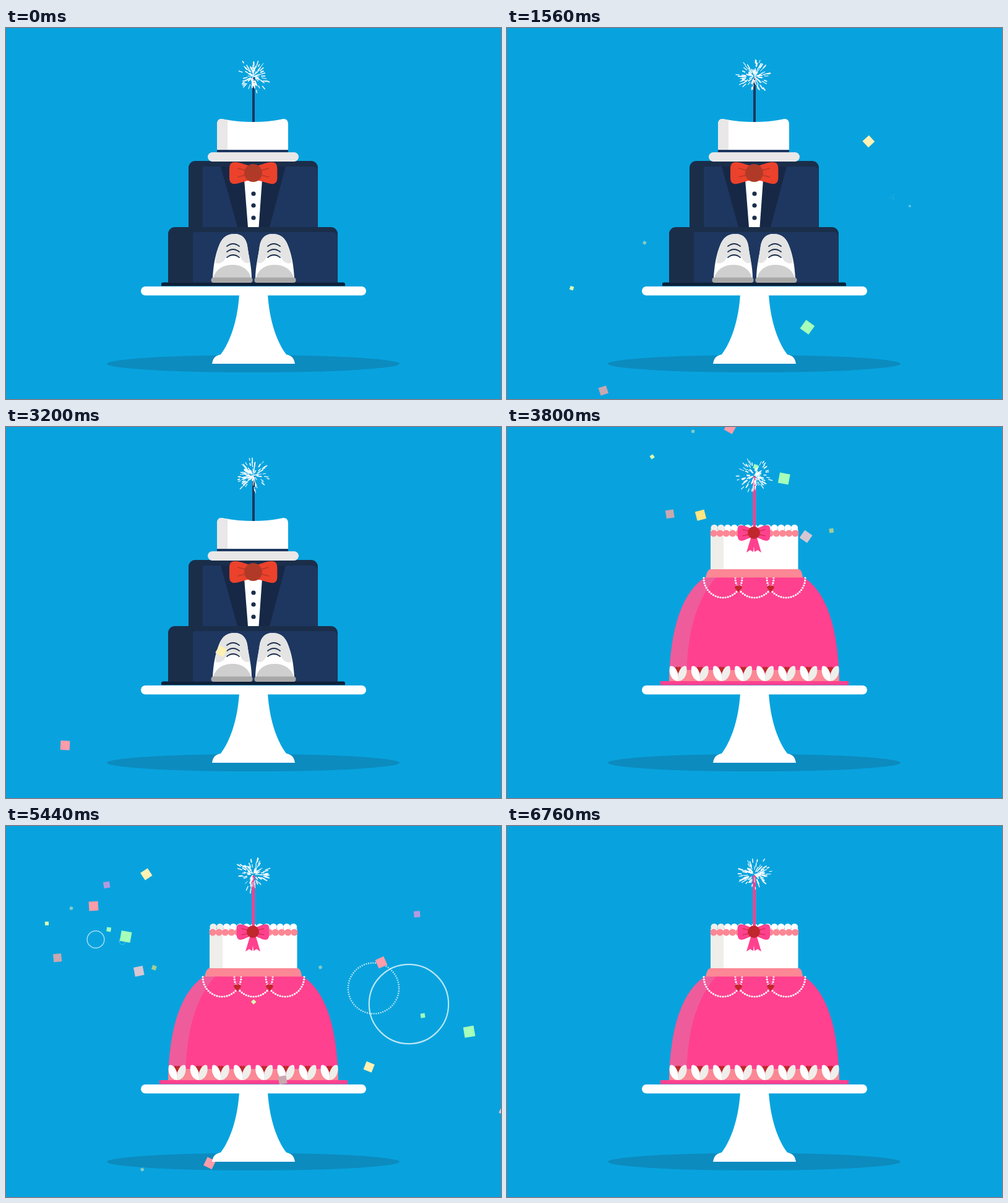
An HTML page with a canvas that plays this animation: 800x600 px, repeating every 6800 ms.

```html
<!DOCTYPE html>
<html lang="en">
<head>
<meta charset="utf-8">
<title>Party cakes</title>
<style>
html, body { margin: 0; width: 100%; height: 100%; overflow: hidden; background: #08a3de; }
canvas { display: block; width: 800px; height: 600px; }
</style>
</head>
<body>
<canvas id="stage" width="800" height="600"></canvas>
<script>
const g = document.getElementById('stage').getContext('2d');
const HALF = 3400, STEP = 40;
const NAVY = '#1e3760', DARK = '#1a2e4a', PINK = '#ff418f', SALMON = '#fc8795', SHADE = '#e9e7e7', CREAM = '#efeeea', RED = '#c0272d';

// ---- helpers
function fill(color, d) { g.fillStyle = color; g.fill(new Path2D(d)); }
function line(color, width, d) {
  g.strokeStyle = color; g.lineWidth = width; g.lineCap = 'round';
  g.stroke(new Path2D(d));
}
function rect(color, x, y, w, h, r = 0) {
  g.fillStyle = color; g.beginPath(); g.roundRect(x, y, w, h, r); g.fill();
}
function oval(color, x, y, rx, ry = rx) {
  g.fillStyle = color; g.beginPath(); g.ellipse(x, y, rx, ry, 0, 0, 7); g.fill();
}
function mirrored(axis, draw) {
  draw();
  g.save(); g.translate(2 * axis, 0); g.scale(-1, 1); draw(); g.restore();
}
function rand(n) {
  const s = Math.sin(n * 127.1 + 31.7) * 43758.5453;
  return s - Math.floor(s);
}

// ---- scenery
function stand() {
  fill('#fff', 'M377 431C374 475 362 508 347 528C339 530 335 532 333 543H467C465 532 461 530 453 528C438 508 426 475 423 431Z');
  rect('#fff', 218, 418, 364, 14.5, 7.2);
}

function shoe() {
  fill('#fff', 'M334 405C335 385 338 366 345 350C350 338 358 333 369 333C381 333 388 340 390 352C392 368 397 385 397 405Z');
  fill('#e4e4e4', 'M338 379C340 366 342 357 345 350C350 338 358 333 369 333C381 333 388 340 390 352L394 379C388 383 381 377 378 369H358C354 377 344 384 338 379Z');
  fill('#fff', 'M357 369H378L384 381Q367 373 349 381Z');
  fill('#cfcfcf', 'M335 404C339 390 351 383 366 383C381 383 392 390 396 404Z');
  rect('#a9a8a8', 331.5, 403.5, 67, 8.5, 4);
  for (let y = 351; y < 371; y += 9) line(DARK, 1.8, `M357 ${y + 2}Q367 ${y - 6} 377 ${y + 2}`);
}

function tuxCake() {
  rect('#0c2139', 251, 411.5, 297, 5.8, [3, 3, 0, 0]);
  rect(DARK, 262, 322, 274, 90, [11, 11, 0, 0]);
  rect(NAVY, 302, 330, 233.5, 81.5, [3, 7, 0, 0]);
  rect(DARK, 295, 215, 209, 107, [11, 11, 0, 0]);
  rect(NAVY, 318, 224, 185.5, 98, [3, 7, 0, 0]);
  fill('#172846', 'M347 224L374 322H426L452 224Z');
  fill('#fff', 'M385 245L391 322H408.5L414 245Z');
  for (const y of [268, 287, 307]) oval(DARK, 400, y, 3.6);
  mirrored(399.7, () => {
    fill('#ec412b', 'M400 224C389 223 381 217 370 217C362 217 361 222 361 229V242C361 249 364 253 371 252C382 250 389 246 400 246Z');
    line('#b23a27', 1.3, 'M386 230L375 227M386 238L375 241');
  });
  oval('#b03a27', 399.5, 234.5, 14.5);
  mirrored(400, shoe);
  rect(NAVY, 398, 80, 4, 73);
  rect(SHADE, 326, 201, 147, 15, 7.5);
  const crown = 'M341 201V156C341 149 345 146 351 147.5C384 153.5 416 153.5 446 147.5C452 146 456 149 456 156V201Z';
  fill('#fff', crown);
  g.save();
  g.clip(new Path2D(crown));
  fill(SHADE, 'M340 140H362C358 146 358 152 358 160V201H340Z');
  rect(NAVY, 341, 197, 115, 4);
  g.restore();
}

function tulip(x) {
  const leaf = 'M0 411C-9 411 -16 400 -13.5 388C-13 386 -9 386 -7 388C-1 392 1 402 0 411Z';
  g.save();
  g.translate(x, 0);
  fill(RED, 'M0 398L-5 391C-5 387 -1 387 0 389C1 387 5 387 5 391Z');
  fill('#fff', leaf);
  g.scale(-1, 1);
  fill(CREAM, leaf);
  g.restore();
}

function pearls(x) {
  for (let i = 0; i <= 24; i++) {
    const a = Math.PI * i / 24;
    oval('#fff', x + 31 * Math.cos(a), 244 + 32 * Math.sin(a), 1.6);
  }
}

function pinkCake() {
  const dome = 'M262 411C264 322 284 264 325 240H475C516 264 535 322 537 411Z';
  rect(PINK, 248, 411, 304, 6.5);
  fill(PINK, dome);
  g.save();
  g.clip(new Path2D(dome));
  fill('#ef5c9c', 'M250 411V230H350C309 270 291 322 290 411Z');
  rect(SALMON, 262, 393, 275, 18);
  g.restore();
  [349, 400, 451].forEach(pearls);
  for (const x of [374, 426]) fill(RED, `M${x} 267L${x - 6} 260C${x - 5} 255 ${x - 1} 255 ${x} 258C${x + 1} 255 ${x + 5} 255 ${x + 6} 260Z`);
  for (let i = 0; i < 8; i++) tulip(276.6 + i * 35.15);
  fill(SALMON, 'M328 230H472Q477 232 478 243.5H321Q323 232 328 230Z');
  rect('#fff', 329, 166, 141.5, 64);
  rect(CREAM, 329, 166, 21, 64);
  for (let i = 0; i < 13; i++) oval(i < 2 ? CREAM : '#fff', 335 + i * 10.8, 163.3, 5.6);
  for (let i = 0; i < 14; i++) oval(SALMON, 334 + i * 10.15, 172, 5.6);
  rect(PINK, 397.4, 80, 4.6, 82);
  mirrored(399, () => {
    fill(PINK, 'M395 176L387 203L393 199L398 202L401 176Z');
    fill(PINK, 'M400 165C391 164 386 159 378 159C373 159 372 163 373 171C372 180 374 184 379 184C387 183 392 178 400 177Z');
    line(RED, 1, 'M390 168L381 166M390 174L381 176');
  });
  oval(RED, 399, 171, 10);
}

// ---- sparkler
function sparkler(t) {
  g.strokeStyle = '#fff';
  g.lineCap = 'butt';
  for (let i = 0; i < 90; i++) {
    const age = t / 280 + rand(i), key = i * 17 + Math.floor(age) * 3.7;
    const a = rand(key) * Math.PI * 2, reach = 22 + 11 * rand(key + 1);
    const r = 8 + (reach - 8) * (age % 1), len = 4 + 5 * rand(key + 2);
    g.lineWidth = 0.9 + 0.9 * rand(key + 3);
    g.beginPath();
    g.moveTo(400 + Math.cos(a) * (r - len), 78 + Math.sin(a) * (r - len));
    g.lineTo(400 + Math.cos(a) * r, 78 + Math.sin(a) * r);
    g.stroke();
  }
}

// ---- rings
function ring(t, x, y, start, size, dotted) {
  const u = (t - start) / 785;
  if (u <= 0 || u >= 1) return;
  const r = size * (1 - (1 - u) ** 3), dot = Math.PI * r / 70;
  g.save();
  g.globalAlpha = 0.72;
  g.strokeStyle = '#fff';
  g.lineCap = 'butt';
  g.lineWidth = Math.min(0.8 + 3 * u, 15 * (1 - u) ** 2);
  if (dotted) g.setLineDash([dot, dot]);
  g.beginPath(); g.arc(x, y, r, 0, Math.PI * 2); g.stroke();
  g.restore();
}

// ---- confetti: colour, size, and the throw from the centre of a burst
const SCRAPS = [
  ['#fff1b3', 14, 108, -204], ['#ff9ca9', 15, -41, -114],
  ['#b39adf', 10, -4, -174], ['#86cbc6', 5, -104, -108],
  ['#dcfab0', 6, -173, -65], ['#c9a8b0', 13, -143, 32],
  ['#a6ffb9', 7, 2, -48], ['#a6ffb9', 17, 50, -28],
  ['#d7c6d2', 15, 87, 70], ['#a4cd95', 7, 130, 60],
  ['#cf99ec', 9, -136, -172], ['#808c97', 10, -122, -140],
  ['#ffe680', 15, -91, 34], ['#b39adf', 10, 42, 112]
];
const first = { x: 400, y: 78, start: 120, count: 14, fall: 0.45, spread: 1, wind: 0, life: 2500 };
const left = { x: 165, y: 183, start: 1900, count: 10, fall: 0.6, spread: 1, wind: 0, life: 1430 };
const right = { x: 622, y: 275, start: 1555, count: 10, fall: 0.5, spread: 1.2, wind: 0.1, life: 1430 };

function burst(b, t) {
  const s = t - b.start;
  if (s <= 0) return;
  const reach = 1.736 * (1 - Math.exp(-s / 350));
  const drop = b.fall * (s - 450 * (1 - Math.exp(-s / 450)));
  SCRAPS.slice(0, b.count).forEach(([color, size, dx, dy], i) => {
    if (s > b.life * (1 - 0.05 * i)) return;
    const w = size * Math.min(1, s / 110), spin = rand(i + b.start);
    g.save();
    g.translate(b.x + dx * b.spread * reach + b.wind * s, b.y + dy * reach + drop);
    g.rotate(spin * 6 + s * (spin - 0.5) * 0.006);
    g.fillStyle = color;
    g.fillRect(-w / 2, -w / 2, w, w);
    g.restore();
  });
}

// ---- playback
function draw(now) {
  const time = Math.floor(now % (2 * HALF) / STEP) * STEP, t = time % HALF;
  rect('#08a3de', 0, 0, 800, 600);
  oval('#0c8bbf', 399.5, 543, 236.5, 14);
  burst(first, t);
  stand();
  if (time < HALF) tuxCake(); else pinkCake();
  sparkler(time);
  ring(t, 651, 288, 1555, 68, false);
  ring(t, 594, 262.5, 1595, 44.7, true);
  ring(t, 145, 183.5, 1914, 34, false);
  ring(t, 188, 186.5, 2013, 50, true);
  burst(left, t);
  burst(right, t);
}

let origin;
function tick(now) {
  if (origin === undefined) origin = now;
  draw(Math.max(0, now - origin));
  requestAnimationFrame(tick);
}
draw(0);
requestAnimationFrame(tick);
</script>
</body>
</html>
```
